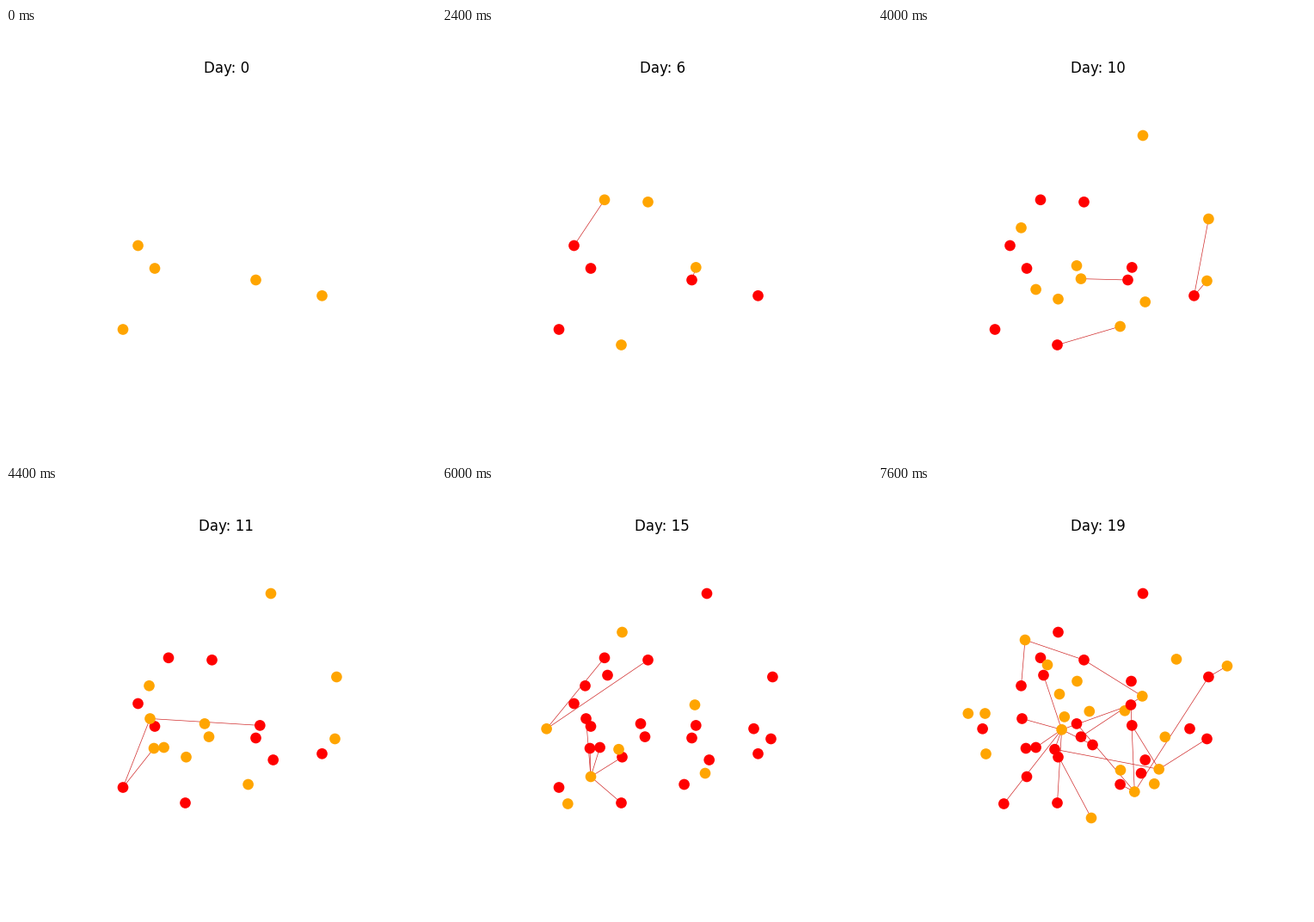
A matplotlib script that plays this animation: 500 px wide and 500 px high, repeating every 8 s.

```python
import matplotlib.pyplot as plt
from matplotlib.animation import FuncAnimation
from matplotlib.collections import LineCollection

DAYS = 20
INCUBATION, SHORT_INCUBATION, ILLNESS = 4, 3, 15
EXPOSED, INFECTIOUS = "orange", "red"

# day of infection -> (name, x, y, contacts who passed it on)
CASES = {
    0: [("A", 153.5, 253, ""), ("B", 173, 279.5, ""), ("C", 290.5, 293, ""),
        ("D", 367.5, 311.3, ""), ("E", 136, 350.5, "")],
    4: [("F", 208.5, 368.5, "B")],
    5: [("G", 239.5, 202.3, "A")],
    6: [("H", 189, 199.8, "A"), ("I", 295.3, 278.4, "C")],
    7: [("J", 310.7, 318.5, "C")],
    8: [("K", 166.5, 232.3, "A"), ("L", 183.6, 304, "BEF")],
    9: [("M", 308, 125, "G"), ("N", 231, 276.4, "B"), ("O", 209.5, 315.2, "E")],
    10: [("P", 384.4, 222, "D"), ("Q", 382.5, 294, "D"),
         ("R", 281.6, 347, "F"), ("S", 236, 291.6, "C")],
    11: [("T", 167.5, 270.5, "EI"), ("U", 172, 305, "E")],
    12: [("V", 192.5, 220, "A"), ("W", 362.5, 282.2, "D")],
    13: [("X", 209.5, 170, "G"), ("Y", 146.3, 369.5, "E"), ("Z", 205.5, 306.2, "F")],
    14: [("a", 294, 254.5, "P"), ("b", 306, 334, "D")],
    15: [("c", 121.6, 282.3, "GH"), ("d", 173, 338, "TULOF")],
    16: [("e", 197, 208, "G"), ("f", 231.5, 227, "T"), ("g", 294.5, 227, "P"),
         ("h", 211, 242, "B"), ("i", 124.5, 264.5, "K"), ("j", 249.5, 301, "QF")],
    17: [("k", 104.8, 264.5, "GKBJ"), ("l", 287, 261.3, "ADL"),
         ("m", 216.8, 268.4, "EOCIW"), ("n", 125.5, 311.5, "LZO"),
         ("o", 282, 330.4, "CD")],
    18: [("p", 347, 201.4, "P"), ("q", 245.8, 262, "T"),
         ("r", 333.8, 291.8, "Q"), ("s", 321.3, 346.3, "F")],
    19: [("t", 171, 179, "KG"), ("u", 307.3, 244.4, "GS"), ("v", 406, 209.3, "P"),
         ("w", 213.6, 283.3, "VTLYZFaj"), ("x", 298.3, 355.5, "PaRN"),
         ("y", 326.7, 329.3, "ZIQ"), ("z", 248, 386, "Z")],
}
FAST = set("ABCDEFGVWgj")
FRONT = "a"

place = {name: (x, y) for group in CASES.values() for name, x, y, _ in group}
infected = {name: day for day, group in CASES.items() for name, *_ in group}
stack = sorted(place, key=lambda name: name == FRONT)


def state(name, day):
    """Colour of a person on a day, or None when not ill."""
    onset = infected[name] + (SHORT_INCUBATION if name in FAST else INCUBATION)
    if day < infected[name] or day >= onset + ILLNESS:
        return None
    return EXPOSED if day < onset else INFECTIOUS


fig, ax = plt.subplots(figsize=(5, 5), dpi=100)
ax.set_xlim(62.5, 450)
ax.set_ylim(445, 60)
ax.axis("off")
title = ax.set_title("Day: 0")
links = ax.add_collection(
    LineCollection([], colors="#d02828", linewidths=0.5, zorder=1), autolim=False)
dots = ax.scatter([], [], s=83, linewidths=0, zorder=2, clip_on=False)


def draw(day):
    ill = [name for name in stack if state(name, day)]
    dots.set_offsets([place[name] for name in ill])
    dots.set_facecolor([state(name, day) for name in ill])
    links.set_segments([(place[name], place[other])
                        for name, _, _, contacts in CASES.get(day, [])
                        for other in contacts])
    title.set_text(f"Day: {day}")
    return links, dots, title


anim = FuncAnimation(fig, draw, frames=DAYS, interval=400, repeat=True, repeat_delay=0)
plt.show()
```
